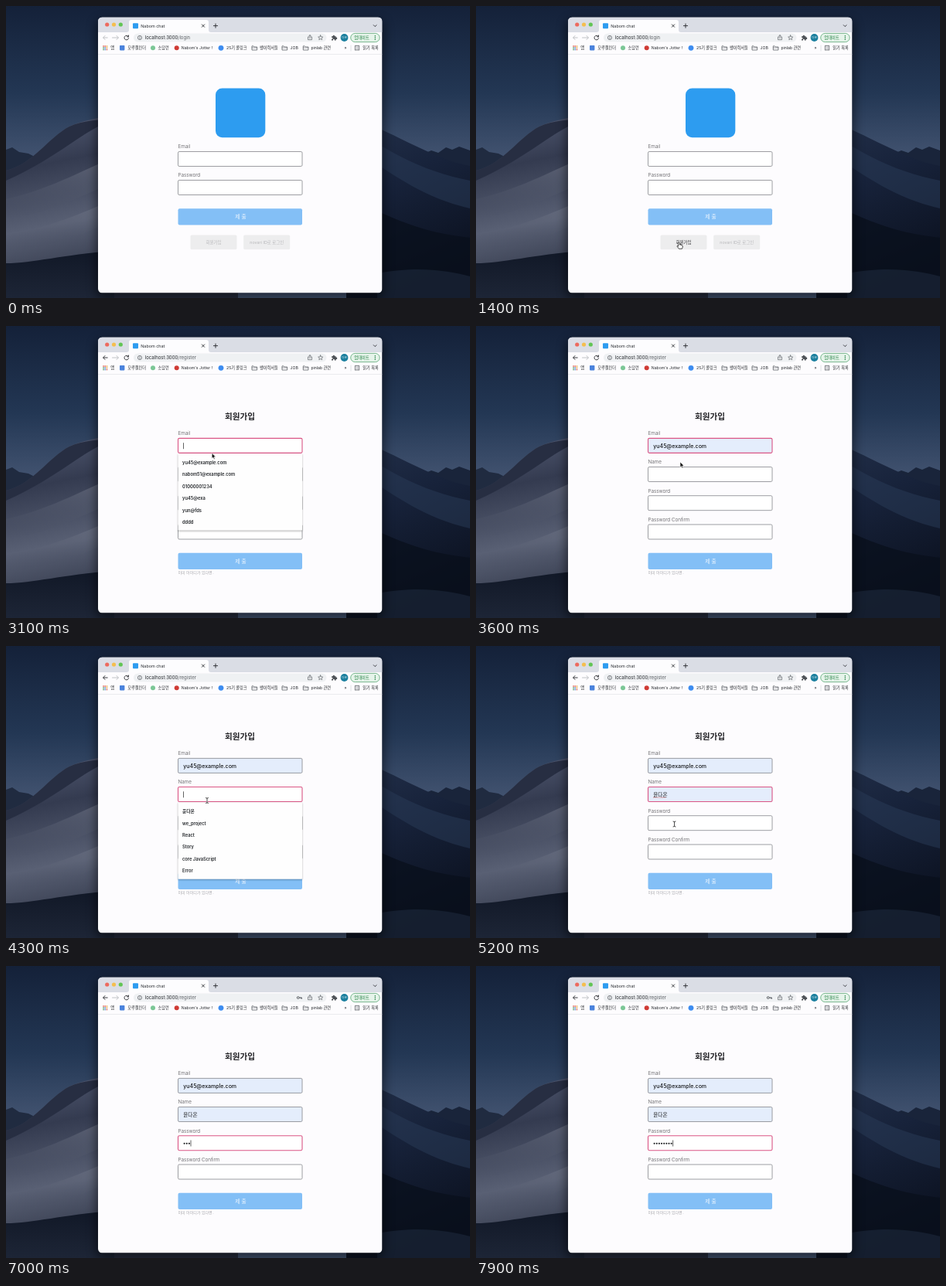
An HTML page for the animation above (8 s loop, 600 by 378 pixels).

```html
<!DOCTYPE html>
<html lang="ko">
<head>
<meta charset="utf-8">
<title>Sign-up demo</title>
<style>
  html, body { margin: 0; width: 100%; height: 100%; overflow: hidden; background: #16233a; }
  svg { display: block; width: 100vw; height: 100vh; }
  text { font-family: Inter, "Noto Sans CJK KR", "Noto Sans CJK", sans-serif; white-space: pre; }
</style>
</head>
<body>
<svg viewBox="0 0 600 378" xmlns="http://www.w3.org/2000/svg">
  <defs>
    <linearGradient id="sky" x1="0" y1="0" x2="0" y2="1">
      <stop offset="0" stop-color="#142139"/><stop offset=".3" stop-color="#233754"/>
      <stop offset=".52" stop-color="#425370"/>
    </linearGradient>
    <linearGradient id="duneL" x1="0" y1="0" x2=".25" y2="1">
      <stop offset="0" stop-color="#59617a"/><stop offset=".3" stop-color="#343b50"/>
      <stop offset=".62" stop-color="#596074"/><stop offset="1" stop-color="#262c3d"/>
    </linearGradient>
    <linearGradient id="ridge" x1="0" y1="0" x2="0" y2="1">
      <stop offset="0" stop-color="#868b9b"/><stop offset="1" stop-color="#3b4256" stop-opacity="0"/>
    </linearGradient>
    <linearGradient id="duneR" x1="0" y1="0" x2=".3" y2="1">
      <stop offset="0" stop-color="#24324c"/><stop offset=".45" stop-color="#17223a"/>
      <stop offset="1" stop-color="#0b111f"/>
    </linearGradient>
    <linearGradient id="low" x1="0" y1="0" x2="0" y2="1">
      <stop offset="0" stop-color="#111827"/><stop offset="1" stop-color="#1d2536"/>
    </linearGradient>
    <filter id="blur" x="-20%" y="-20%" width="140%" height="140%"><feGaussianBlur stdDeviation="7"/></filter>
    <filter id="soft" x="-10%" y="-10%" width="120%" height="130%"><feGaussianBlur stdDeviation="1.2"/></filter>
    <clipPath id="win"><rect x="119" y="14.5" width="367.5" height="357" rx="5.5"/></clipPath>
  </defs>

  <rect width="600" height="378" fill="url(#sky)"/>
  <path d="M0 186l8-3 9 6 12 2 14 7v20H0z" fill="#202b40"/>
  <path d="M0 213C35 205 55 170 82 156C110 143 180 130 300 145V378H0z" fill="url(#duneL)"/>
  <path d="M0 213C35 205 55 170 82 156C100 148 119 147 140 147C100 160 70 195 0 226z" fill="#272e42"/>
  <path d="M0 250C45 240 82 222 140 195V228C88 250 50 270 0 276z" fill="url(#ridge)" opacity=".55"/>
  <path d="M0 296C50 288 88 273 140 250V276C90 302 45 314 0 318z" fill="url(#ridge)" opacity=".5"/>
  <path d="M0 333C35 333 72 322 140 317V378H0z" fill="url(#low)"/>
  <path d="M520 200l18-8 12-5 9 3 10-7 8 3 9-4 14 5v35h-90z" fill="#19243a"/>
  <path d="M440 140C510 168 555 199 600 207V378H440z" fill="url(#duneR)"/>
  <path d="M480 178C525 205 560 218 600 226V262C555 252 520 232 480 205z" fill="#2b3c59" opacity=".5"/>
  <path d="M480 265C520 285 560 296 600 300V378H480z" fill="#090f1b" opacity=".75"/>
  <path d="M480 346C530 337 565 341 600 350V378H480z" fill="#1a2538" opacity=".7"/>

  <rect x="117" y="19" width="371.500" height="358" rx="7" fill="#000" opacity=".55" filter="url(#blur)"/>
  <g id="chrome" clip-path="url(#win)"></g>
  <g id="live"></g>
</svg>
<script>
const LOOP = 8000, STEP = 100;
const LEFT = 222.5, WIDE = 160.5, TALL = 19;
const INK = '#25282c', GREY = '#5f6368', BLUE = '#2d9cf0';

const rect = (x, y, w, h, fill, extra = '') =>
  `<rect x="${x}" y="${y}" width="${w}" height="${h}" fill="${fill}" ${extra}/>`;
const disc = (x, y, r, fill, extra = '') => `<circle cx="${x}" cy="${y}" r="${r}" fill="${fill}" ${extra}/>`;
const text = (x, y, size, s, fill = INK, extra = '') =>
  `<text x="${x}" y="${y}" font-size="${size}" fill="${fill}" ${extra}>${s}</text>`;
const line = (d, color = GREY, w = 0.9, extra = '') =>
  `<path d="${d}" fill="none" stroke="${color}" stroke-width="${w}" stroke-linecap="round" stroke-linejoin="round" ${extra}/>`;
const MID = 'text-anchor="middle"';

function browser() {
  let s = rect(119, 14.5, 367.5, 357, '#fdfcfe') + rect(119, 14.5, 367.5, 19.5, '#dadde5');
  ['#ed6a5e', '#f4be4f', '#61c554'].forEach((c, i) => s += disc(130.7 + i * 8.8, 24, 2.6, c));
  s += '<path d="M156 34Q159 34 159 31V21Q159 18 162 18H259Q262 18 262 21V31Q262 34 265 34z" fill="#fdfdfe"/>';
  s += rect(164, 22.2, 7, 7, BLUE, 'rx="1"') + text(174.3, 27.8, 5.4, 'Nabom chat');
  s += line('M253.300 23.900l3.400 3.400m0-3.400l-3.400 3.400', INK) + line('M268.400 25.600h5.200m-2.600-2.600v5.200', INK);
  s += line('M475.300 24.700l1.900 1.900 1.900-1.900', INK);

  s += line('M145 38.500l2.400 2.500-2.400 2.500M139.500 41h7.600', '#b9bbbf', 0.9, 'transform="translate(-2)"');
  s += line('M158 39.300a2.800 2.800 0 1 0 .6 2.400M158.500 38v1.900h-1.900', INK);
  s += rect(165, 35.4, 249.5, 11.2, '#eff1f3', 'rx="5.6"');
  s += disc(173, 41, 2.6, 'none', `stroke="${GREY}" stroke-width=".75"`) + line('M173 40.900v1.300M173 39.600v.1', GREY, 0.8);
  s += line('M391.800 40h-1.300v3.700h5V40h-1.300M393 42v-4.300m-1.300 1.200l1.300-1.300 1.300 1.300', GREY, 0.7);
  s += line('M406.700 37.900l.9 2 2.200.2-1.700 1.500.5 2.100-1.900-1.100-1.900 1.100.5-2.100-1.700-1.500 2.200-.2z', GREY, 0.7);
  s += '<path d="M421 39.200h1.700a1.200 1.200 0 1 1 2.300 0h1.700v1.500a1.200 1.200 0 1 1 0 2.300v1.400h-2a1 1 0 1 0-1.700 0h-2v-1.800a1 1 0 1 0 0-1.700z" fill="#4c5055"/>';
  s += disc(437.5, 41, 4.9, '#1b7f9e') + text(437.5, 42.4, 3.8, '다온', '#e3f1f5', MID);
  s += rect(445.7, 35.4, 37.5, 11.2, '#e6f4ea', 'rx="5.6" stroke="#58a873" stroke-width=".8"');
  s += text(450.3, 43, 5.3, '업데이트', '#1b7a3d', 'font-weight="500"');
  [38.7, 41, 43.3].forEach(y => s += disc(477.3, y, 0.75, '#1b7a3d'));

  const dots = ['#e0564a', '#e0564a', '#e8a33c', '#4c9b5c', '#4a7fd8', '#e8a33c', '#4c9b5c', '#4a7fd8', '#e0564a'];
  dots.forEach((c, i) => s += rect(125.3 + i % 3 * 2.2, 51.3 + Math.floor(i / 3) * 2.2, 1.5, 1.5, c));
  s += rect(147, 51, 6.4, 6.4, '#4a82dc', 'rx=".8"') + disc(190, 54.3, 3, '#7cc796')
    + disc(220.7, 54.3, 3, '#cf3b35') + disc(278, 54.3, 3.4, '#3d8cf0');
  [318, 357, 384.3].forEach(x =>
    s += line(`M${x} 52.200v4.800h6.600v-4h-3.400l-.8-.8z`, GREY, 0.8) + line(`M${x} 54h6.500`, GREY, 0.6));
  const marks = [[135.3, '앱'], [157.3, '모루캘린더'], [196.6, '소담런'], [226.8, 'Nabom\'s Jotter !'], [285, '25기 콜링크'],
    [328, '쌩이력서들'], [367.6, 'JOB'], [394.4, 'pinlab 관련'], [437.5, '»'], [461.3, '읽기 목록']];
  marks.forEach(([x, label]) => s += text(x, 56.2, 5.15, label));
  s += line('M446 51v7', '#cfd2d6', 0.6) + rect(451.3, 51.6, 5.4, 5.4, 'none', `stroke="${GREY}" stroke-width=".8"`);
  s += line('M453 53.300h2.300m-2.300 2h2.300', GREY, 0.6) + rect(119, 62, 367.5, 0.7, '#e2e4e8');
  return s;
}

// Sign-up form: field tops and when each one is focused, listed and filled
const fields = [
  { label: 'Email', y: 145.4, focus: 2800, blur: 4100, open: 2900, done: 3600, value: 'yu45@example.com',
    items: ['yu45@example.com', 'nabom51@example.com', '01000001234', 'yu45@exa', 'yun@fds', 'dddd'] },
  { label: 'Name', y: 182.5, focus: 4100, blur: 5500, open: 4200, done: 4700, value: '윤다온',
    items: ['윤다온', 'we_project', 'React', 'Story', 'core JavaScript', 'Error'] },
  { label: 'Password', y: 219.7, focus: 5500, blur: LOOP, open: 5600, done: 6700 },
  { label: 'Password Confirm', y: 257 }
];
const PAGE_TURN = 1700, TYPING = 6700, KEY_GAP = 130, LIST_H = 99.5, ROW = 15.4;

// Pointer path: time, x, y
const path = [[300, 300, 333], [1100, 264, 308], [1400, 262.5, 306], [2000, 262.5, 306], [2700, 262, 157], [2900, 263, 158],
  [3100, 266.2, 164.6], [3350, 264, 176], [3650, 264, 176], [4000, 261, 195], [4300, 260, 200], [4550, 252, 213],
  [4750, 252, 213], [5200, 256.5, 230.5], [5600, 256, 231], [6200, 255.5, 237], [TYPING, 255.5, 237]];

function pointerAt(t) {
  const i = path.findIndex(p => p[0] > t);
  if (i < 1) return null;
  const [t0, x0, y0] = path[i - 1], [t1, x1, y1] = path[i];
  const k = (t - t0) / (t1 - t0), e = k * k * (3 - 2 * k);
  return { x: x0 + (x1 - x0) * e, y: y0 + (y1 - y0) * e };
}

const inside = (p, x, y, w, h) => p && p.x >= x && p.x <= x + w && p.y >= y && p.y <= y + h;
const within = (t, a, b) => t >= a && t < b;

function input(y, label, focused, filled) {
  return text(LEFT, y - 4.1, 6.3, label, '#4d4d50', 'font-weight="300"')
    + rect(LEFT, y, WIDE, TALL, filled ? '#e4edfc' : '#fff',
      `rx="1.6" stroke="${focused ? '#da5585' : '#85868b'}" stroke-width="${focused ? 1.1 : 0.8}"`);
}

function submit(y) {
  return rect(LEFT, y, WIDE, 21.3, '#83bff6', 'rx="2"') + text(303.5, y + 13, 6.8, '제 출', '#eef6fe', MID);
}

function login(p) {
  const button = (x, label) => {
    const over = inside(p, x, 296.5, 60, 18.7);
    return rect(x, 296.5, 60, 18.7, '#ededee', 'rx="1.6"')
      + text(x + 30, 308.2, 5.4, label, over ? '#26262a' : '#b7b7ba', MID);
  };
  return rect(271, 106.5, 64.3, 63.7, BLUE, 'rx="8.5"')
    + input(188.5, 'Email') + input(225.5, 'Password') + submit(262.3)
    + button(238.5, '회원가입') + button(307.2, 'novari ID로 로그인');
}

function list(f, p) {
  const top = f.y + TALL + 0.7;
  const h = f.items ? LIST_H : 19.4;
  let s = rect(LEFT, top + 1, WIDE, h, '#000', 'opacity=".3" filter="url(#soft)"')
    + rect(LEFT, top, WIDE, h, f.items ? '#fefefe' : '#e3e3e4', 'rx=".8"');
  if (!f.items) {
    return s + disc(231, top + 9.6, 3.6, '#4285f4') + text(239.5, top + 11.6, 5.35, 'Novari 계정에 저장된 비밀번호 사용', INK, 'font-weight="500"');
  }
  f.items.forEach((item, i) => {
    const y = top + 4 + i * ROW;
    if (inside(p, LEFT, y, WIDE, ROW)) s += rect(LEFT, y, WIDE, ROW, '#e5e5e7');
    s += text(228, f.y + 33.6 + i * ROW, 5.75, item, INK, 'font-weight="600"');
  });
  return s;
}

function register(t, p) {
  const typed = t < TYPING ? 0 : Math.min(8, Math.floor((t - TYPING) / KEY_GAP) + 1);
  let s = text(302.500, 121, 10.6, '회원가입', '#202024', `${MID} font-weight="600"`);
  for (const f of fields) {
    const focused = within(t, f.focus, f.blur);
    const filled = f.value && t >= f.done;
    s += input(f.y, f.label, focused, filled);
    if (filled) {
      s += text(229.3, f.y + 12.2, f.label === 'Name' ? 6.6 : 7, f.value, '#17181b', 'font-weight="500"');
      if (focused && f.label === 'Name') s += line(`M229.500 ${f.y + 13.6}h17`, '#d9534f', 0.8, 'stroke-dasharray=".2 1.5"');
    }
    const dots = f.label === 'Password' ? typed : 0;
    for (let i = 0; i < dots; i++) s += disc(230.6 + i * 3.15, f.y + 10, 1.05, '#17181b');
    if (focused && !filled && (dots || (t - f.focus) % 1000 < 500)) {
      s += rect(229.2 + dots * 3.15, f.y + 5.8, 0.7, 8, '#222');
    }
  }
  s += submit(293.7) + text(LEFT, 321, 5, '이미 아이디가 있다면..', '#a9a9ad', 'font-weight="300"');
  const open = fields.find(f => within(t, f.open, f.done));
  if (open) s += list(open, p);
  if (typed) s += disc(377.7, 41, 1.4, 'none', `stroke="${GREY}" stroke-width="1"`) + line('M379.300 41h3.200v1.200m-1.300-1.200v1', GREY, 1);
  return s;
}

function pointer(t, p) {
  if (!p) return '';
  const onForm = t >= PAGE_TURN;
  const open = fields.find(f => within(t, f.open, f.done));
  const onList = open && inside(p, LEFT, open.y + TALL, WIDE, open.items ? LIST_H : 19);
  const onInput = onForm && !onList && fields.some(f => inside(p, LEFT, f.y, WIDE, TALL));
  const place = `transform="translate(${p.x} ${p.y})"`;
  if (onInput) {
    const beam = 'M-1.500-3.500Q0-3.500 0-2.500Q0-3.500 1.500-3.500M0-2.500V2.500M-1.500 3.500Q0 3.500 0 2.500Q0 3.500 1.500 3.500';
    return `<g ${place}>${line(beam, '#fff', 1.5)}${line(beam, '#222', 0.8)}</g>`;
  }
  const hand = 'M-.9 1.500Q-.9.300 0 .300T.9 1.500V3.300Q2-.1 2.300 3.500Q3.600 3 3.700 4.100Q4.700 3.700 4.700 5V6.200L3.900 8.300H-.1L-2.400 5.300Q-2.700 4.200-1.600 4.500L-.9 5.200z';
  const arrow = 'M0 0V6.800L1.600 5.400L2.700 7.900L3.900 7.400L2.800 5H5z';
  const onButton = !onForm && inside(p, 238.5, 296.5, 60, 18.7);
  return onButton
    ? `<path d="${hand}" ${place} fill="#fff" stroke="#222" stroke-width=".8"/>`
    : `<path d="${arrow}" ${place} fill="#111" stroke="#fff" stroke-width=".6"/>`;
}

function scene(t) {
  const p = pointerAt(t), onForm = t >= PAGE_TURN;
  const url = `localhost:3000<tspan fill="${GREY}">/${onForm ? 'register' : 'login'}</tspan>`;
  return line('M128 38.500l-2.400 2.500 2.400 2.500M125.900 41h5.300', onForm ? INK : '#b9bbbf')
    + text(179.8, 43.1, 6, url)
    + (onForm ? register(t, p) : login(p))
    + pointer(t, p);
}

document.getElementById('chrome').innerHTML = browser();
const live = document.getElementById('live');
let shown = -1;

function tick(now) {
  const t = Math.floor(now % LOOP / STEP) * STEP;
  if (t !== shown) {
    live.innerHTML = scene(t);
    shown = t;
  }
  requestAnimationFrame(tick);
}
tick(0);
</script>
</body>
</html>
```
